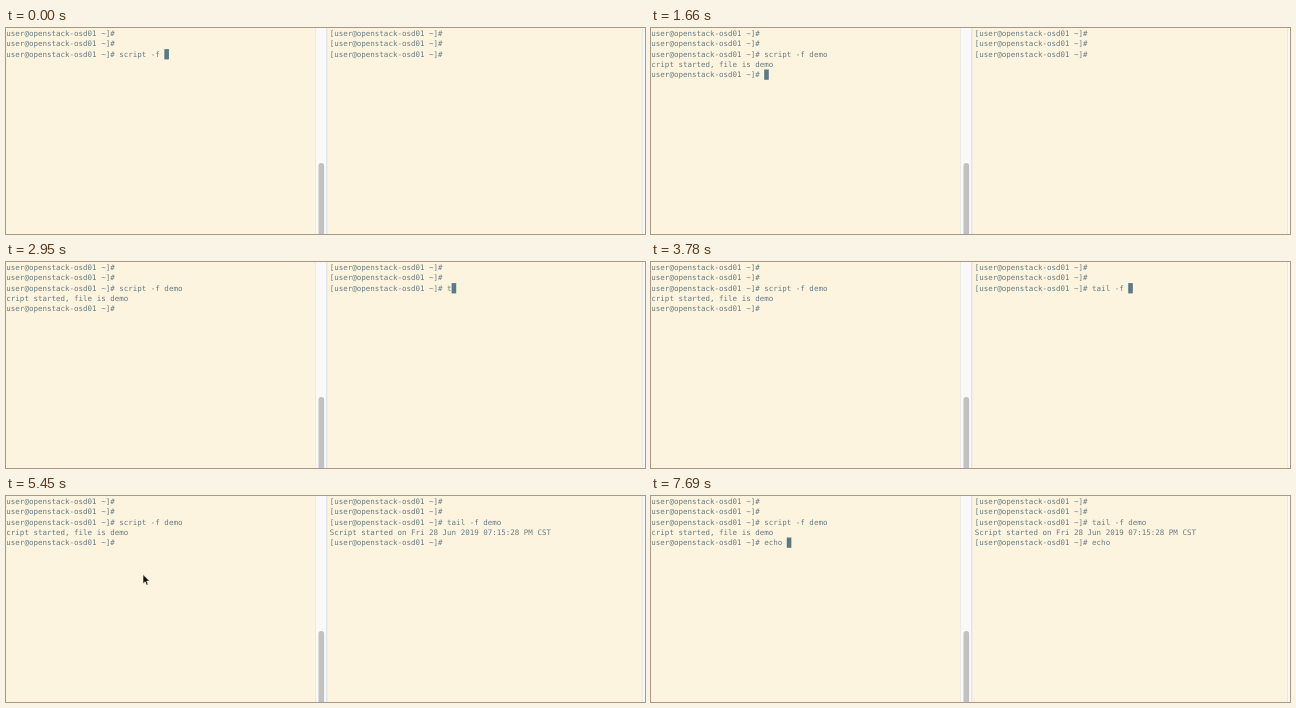
An HTML page for the animation above (8000 ms loop, 639 by 206 pixels).

```html
<!DOCTYPE html>
<html lang="en">
<head>
<meta charset="utf-8">
<title>Terminal session</title>
<style>
  html, body { margin: 0; width: 100%; height: 100%; overflow: hidden; background: #fdf4df; }
  svg { display: block; width: 639px; height: 206px; }
  text {
    font: 7.5px "DejaVu Sans Mono", "Liberation Mono", monospace;
    fill: #667c83; white-space: pre; text-rendering: geometricPrecision;
  }
</style>
</head>
<body>
<svg viewBox="0 0 639 206">
  <rect width="639" height="206" fill="#fdf4df"/>
  <rect x="309" width="12" height="206" fill="#f9f9f9"/>
  <rect x="309" width="1" height="206" fill="#ebeae6"/>
  <rect x="320" width="1.5" height="206" fill="#e1e6ea"/>
  <rect x="312.5" y="135" width="5.6" height="80" rx="2.8" fill="#c1c1c1"/>
  <rect x="636" width="3" height="206" fill="#f9f9f9"/>
  <rect x="636" width="1" height="206" fill="#e8e8e5"/>
  <g id="left"></g>
  <g id="right"></g>
  <rect id="cursor" width="4.6" height="10.3" fill="#597b87"/>
  <path id="arrow" d="M0 0V9.2L2.1 7.2L3.6 10.7L5.2 10L3.7 6.6H6.6Z" fill="#111" stroke="#fff" stroke-width=".6"/>
</svg>
<script>
const LOOP = 8000, CELL = 4.515, PITCH = 10.2;
const PROMPT = '[user@openstack-osd01 ~]# ';
const $ = id => document.getElementById(id);

// command and output of each pane
const panes = {
  left: { x: -4.2, cmd: 'script -f demo', out: 'Script started, file is demo' },
  right: { x: 323.7, cmd: 'tail -f demo', out: 'Script started on Fri 28 Jun 2019 07:15:28 PM CST' }
};

// Each step changes part of the state:
// l, r: typed characters; lo, ro: output shown; e: echoed characters;
// c: pane with the cursor; p: pointer position
const steps = [
  [0, { l: 10, r: 0, lo: 0, ro: 0, e: 0, c: 'left', p: null }],
  [110, { l: 11 }],
  [230, { l: 12 }],
  [470, { l: 13 }],
  [590, { l: 14 }],
  [940, { lo: 1 }],
  [1180, { c: '' }],
  [1660, { c: 'left' }],
  [2260, { c: '' }],
  [2490, { p: [483.5, 50] }],
  [2720, { c: 'right' }],
  [2950, { r: 1, p: null }],
  [3070, { r: 2 }],
  [3190, { r: 3 }],
  [3310, { r: 4, c: '' }],
  [3550, { r: 6, c: 'right' }],
  [3670, { r: 7 }],
  [3780, { r: 8 }],
  [4140, { r: 9 }],
  [4260, { r: 10 }],
  [4370, { r: 11 }],
  [4490, { r: 12, c: '' }],
  [4730, { ro: 1, c: 'right' }],
  [5090, { c: '', p: [451, 62] }],
  [5210, { p: [290, 72] }],
  [5330, { p: [165, 78] }],
  [5450, { p: [137, 78.5] }],
  [5680, { c: 'left' }],
  [6160, { c: '' }],
  [6750, { c: 'left' }],
  [7110, { e: 1, p: null }],
  [7230, { e: 2 }],
  [7340, { e: 3 }],
  [7450, { e: 4, c: '' }],
  [7690, { e: 5, c: 'left' }]
];

for (const id in panes) {
  const pane = panes[id];
  pane.rows = Array.from({ length: 5 }, (_, i) => {
    const row = document.createElementNS('http://www.w3.org/2000/svg', 'text');
    row.setAttribute('x', pane.x);
    row.setAttribute('y', 8.2 + i * PITCH);
    $(id).append(row);
    return row;
  });
}

function place(el, x, y) {
  el.setAttribute('transform', `translate(${x} ${y})`);
}

function drawPane(id, typed, done, echo, active) {
  const { x, cmd, out, rows } = panes[id];
  const lines = [PROMPT, PROMPT, PROMPT + cmd.slice(0, typed)];
  if (done) lines.push(out, PROMPT + 'echo '.slice(0, echo));
  rows.forEach((row, i) => row.textContent = lines[i] || '');
  if (active) {
    const last = lines.length - 1;
    place($('cursor'), x + lines[last].length * CELL, 0.7 + last * PITCH);
  }
}

function render(t) {
  const s = {};
  for (const [at, change] of steps) if (at <= t) Object.assign(s, change);
  drawPane('left', s.l, s.lo, s.e, s.c === 'left');
  drawPane('right', s.r, s.ro, s.e, s.c === 'right');
  $('cursor').style.display = s.c ? '' : 'none';
  $('arrow').style.display = s.p ? '' : 'none';
  if (s.p) place($('arrow'), ...s.p);
}

const start = performance.now();
function tick() {
  render((performance.now() - start) % LOOP);
  requestAnimationFrame(tick);
}
tick();
</script>
</body>
</html>
```
